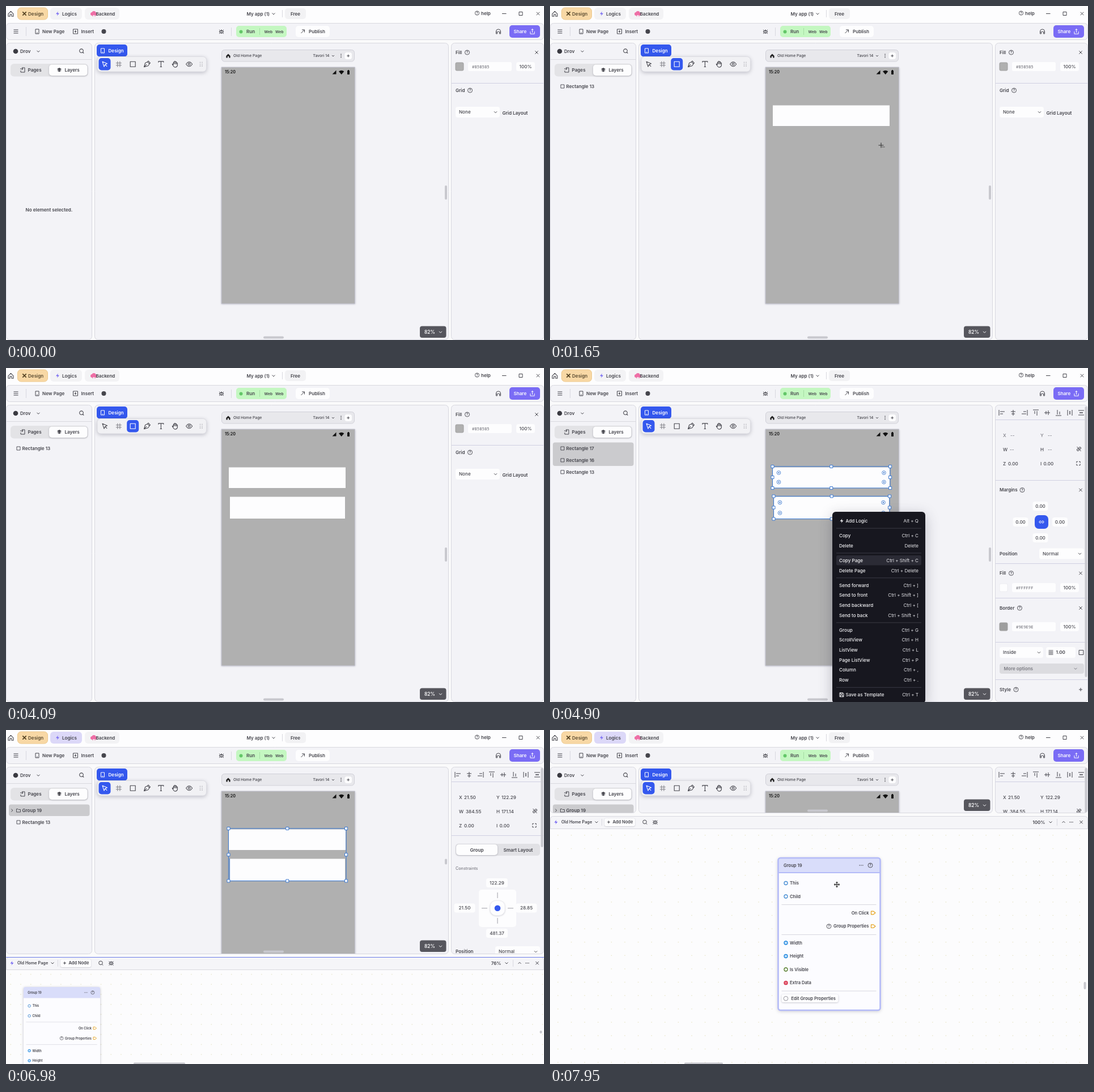
An HTML page with a canvas that plays this animation: 949 by 590 pixels, repeating every 7.99 s.

```html
<!DOCTYPE html>
<html lang="en">
<head>
<meta charset="utf-8">
<title>App builder walkthrough</title>
<style>
html, body { margin: 0; width: 100%; height: 100%; overflow: hidden; background: #fafafb; }
canvas { display: block; width: 949px; height: 590px; }
</style>
</head>
<body>
<canvas id="stage"></canvas>
<script>
const W = 949, H = 590, LOOP = 7990;
const canvas = document.getElementById('stage');
const ctx = canvas.getContext('2d');
const dpr = window.devicePixelRatio || 1;
canvas.width = W * dpr;
canvas.height = H * dpr;

const INK = '#45454c', SOFT = '#7c7c84', LINE = '#d8d8df', PANEL = '#f3f3f7';
const BLUE = '#3458ee', PAGE = '#b0b0b0', SELECT = '#3f7bd0', WHITE = '#fdfdfe';
const SANS = 'Inter, "Open Sans", sans-serif', MONO = '"Noto Sans Mono", monospace';

// Icons are drawn around their own centre.
const ICON = {
  home: 'M-4.5 0 0-4.5 4.5 0V4.5H1.5V1H-1.5V4.5H-4.5Z',
  x: 'M-2.7-2.7 2.7 2.7M2.7-2.7-2.7 2.7',
  plus: 'M-3 0H3M0-3V3',
  down: 'M-2.5-1.2 0 1.3 2.5-1.2',
  up: 'M-2.5 1.2 0-1.3 2.5 1.2',
  right: 'M-1.2-2.5 1.3 0-1.2 2.5',
  bolt: 'M1-4-3 .8H0L-1 4 3-.8H0Z',
  menu: 'M-4-3H4M-4 0H4M-4 3H4',
  phone: 'M-3-4H3V4H-3ZM-.8 2.4H.8',
  insert: 'M-4-4H4V4H-4ZM-2 0H2M0-2V2',
  bug: 'M-2.5-1.5H2.5V2Q0 5-2.5 2ZM-1.5-1.5Q0-4.5 1.5-1.5M-4-3-2.5-1.5M4-3 2.5-1.5M-4.3.6H-2.5M2.5.6H4.3M-4 4-2.3 2.5M4 4 2.3 2.5M-1 .5H1M-1 2H1',
  arrow: 'M-3 3 3-3M-1.5-3H3V1.5',
  upload: 'M-3.6 0V4.3H3.6V0M0 2V-4.5M-2-2.5 0-4.5 2-2.5',
  headset: 'M-4 2V0A4 4 0 0 1 4 0V2M-4 1H-2V4H-4ZM4 1H2V4H4ZM-2 1Q0-1 2 1',
  search: 'M3.3 0A3.3 3.3 0 1 1-3.3 0A3.3 3.3 0 1 1 3.3 0M2.4 2.4 4.3 4.3',
  pages: 'M-1-4H4V4H-3V1M-4-2H1M-1-4 1-2-1 0',
  layers: 'M0-4 4-1.5 0 1-4-1.5ZM-4 .8 0 3.5 4 .8',
  tools: 'M-3.2-3.2 3.2 3.2M3.2-3.2-3.2 3.2',
  cursor: 'M-4-4.5 4.5-1 .8.8-1 4.5ZM1 1 4.2 4.2',
  grid: 'M-2-5V5M2-5V5M-5-2H5M-5 2H5',
  box: 'M-4.5-4.5H4.5V4.5H-4.5Z',
  pen: 'M-5 5-3-2 1-4 4.5-.5 2 3ZM-5 5-.5.5M1-4 2.5-5.5 5.8-2 4.5-.5',
  type: 'M-4.5-3V-4.8H4.5V-3M0-4.8V4.8M-1.7 4.8H1.7',
  hand: 'M-3 1V-3Q-2-4.5-1.4-3V-.5V-4.5Q-.3-6 .6-4.5V-.5V-3.8Q1.6-5 2.4-3.8V0V-2Q3.5-3 4.2-2V2Q3.5 5.5 0 5.5Q-2 5.5-5 0Q-4.5-1-3 1',
  eye: 'M-5.5 0Q0-8 5.5 0Q0 8-5.5 0ZM1.8 0A1.8 1.8 0 1 1-1.8 0A1.8 1.8 0 1 1 1.8 0',
  folder: 'M-3.5-2.5H-1L0-1.5H3.5V3H-3.5Z',
  small: 'M-3-3H3V3H-3Z',
  link: 'M-.8-1.8H-2.2A1.8 1.8 0 0 0-2.2 1.8H-.8M.8-1.8H2.2A1.8 1.8 0 0 1 2.2 1.8H.8M-1.8 0H1.8',
  expand: 'M-3.2-1V-3.2H-1M1-3.2H3.2V-1M3.2 1V3.2H1M-1 3.2H-3.2V1',
  save: 'M-3.5-3.5H2L3.5-2V3.5H-3.5ZM-2-3.5V-1.2H1.5V-3.5M-2 3.5V.8H2V3.5',
  event: 'M-3.5-2.8H.5L4 0 .5 2.8H-3.5Z',
  weight: 'M-4-3.5H4M-4-1H4M-4 1.3H4M-4 3.5H4',
  alignLeft: 'M-5-5V5M-3-2H5M-3 2H2',
  alignMid: 'M0-5V5M-4-2H4M-3 2H3',
  cross: 'M-4.5 0H4.5M0-4.5V4.5',
  move: 'M-4.5 0H4.5M0-4.5V4.5M-3-1.5-4.5 0-3 1.5M3-1.5 4.5 0 3 1.5M-1.5-3 0-4.5 1.5-3M-1.5 3 0 4.5 1.5 3'
};
const shapes = {};
for (const k in ICON) shapes[k] = new Path2D(ICON[k]);

function icon(name, x, y, color = INK, o = {}) {
  ctx.save();
  ctx.translate(x, y);
  ctx.rotate(o.turn || 0);
  const k = o.k || 1;
  ctx.scale(k, k);
  ctx.lineWidth = (o.w || 1) / k;
  ctx.lineJoin = 'round';
  ctx.strokeStyle = ctx.fillStyle = color;
  if (o.fill) ctx.fill(shapes[name]);
  else ctx.stroke(shapes[name]);
  ctx.restore();
}

function text(s, x, y, o = {}) {
  const size = o.size || 8.1;
  ctx.font = `${o.weight || 600} ${size}px ${o.font || SANS}`;
  ctx.fillStyle = o.color || INK;
  ctx.textAlign = o.align || 'left';
  ctx.fillText(s, x, y + size * 0.36);
}

function rect(x, y, w, h, r, fill, stroke, shadow) {
  ctx.save();
  ctx.beginPath();
  ctx.roundRect(x, y, w, h, r);
  if (shadow) {
    ctx.shadowColor = 'rgba(40,40,60,.28)';
    ctx.shadowBlur = shadow * dpr;
    ctx.shadowOffsetY = shadow / 4 * dpr;
  }
  if (fill) { ctx.fillStyle = fill; ctx.fill(); }
  ctx.restore();
  if (stroke) { ctx.strokeStyle = stroke; ctx.lineWidth = 1; ctx.stroke(); }
}

function dot(x, y, r, fill, stroke, w = 1) {
  ctx.beginPath();
  ctx.arc(x, y, r, 0, 7);
  if (fill) { ctx.fillStyle = fill; ctx.fill(); }
  if (stroke) { ctx.strokeStyle = stroke; ctx.lineWidth = w; ctx.stroke(); }
}

function line(x1, y1, x2, y2, color = LINE, w = 1) {
  ctx.beginPath();
  ctx.moveTo(x1, y1);
  ctx.lineTo(x2, y2);
  ctx.strokeStyle = color;
  ctx.lineWidth = w;
  ctx.stroke();
}

function help(x, y, r = 4) {
  dot(x, y, r, null, INK, 0.9);
  text('?', x, y, { size: r * 1.6, align: 'center' });
}

function more(x, y, dx, dy, color = INK) {
  for (let i = -1; i < 2; i++) dot(x + i * dx, y + i * dy, 0.8, color);
}

function panel(x, y, w, bottom, draw) {
  rect(x + 0.5, y + 0.5, w - 1, bottom - y - 1, 6, PANEL, LINE);
  ctx.save();
  ctx.beginPath();
  ctx.roundRect(x + 1, y + 1, w - 2, bottom - y - 2, 5);
  ctx.clip();
  draw();
  ctx.restore();
}

// Timing
const clamp = v => Math.max(0, Math.min(1, v));
const ease = v => v * v * (3 - 2 * v);
const span = (t, a, b) => ease(clamp((t - a) / (b - a)));
const mix = (a, b, p) => a + (b - a) * p;

// Position along stops of [time, x, y].
function along(stops, t) {
  let i = 0;
  while (i < stops.length - 2 && t > stops[i + 1][0]) i++;
  const [a, b] = [stops[i], stops[i + 1]];
  const p = span(t, a[0], b[0]);
  return [mix(a[1], b[1], p), mix(a[2], b[2], p)];
}

const CROSS = [[820, 330, 140], [1000, 393, 175], [1400, 599, 212], [1650, 584, 246],
  [2250, 395, 227], [2450, 395, 227], [3300, 598, 266], [3600, 592, 285], [3950, 384, 130]];

function stateAt(t) {
  const s = { t };
  s.rectTool = t >= 600 && t < 4200;
  s.stage = t < 4450 ? 'page' : t < 5340 ? 'multi' : 'group';
  s.cross = t >= 820 && t < 3950 ? along(CROSS, t) : null;
  s.logic = t >= 6540;
  s.top = s.logic ? mix(401, 152, span(t, 7020, 7320)) : 595;
  s.bottom = s.top - 5;
  s.menu = t >= 4740 && t < 5340 ? 1 : t >= 6020 && t < 6540 ? 2 : 0;
  s.hover = '';
  if (s.menu === 1 && t > 4850) {
    s.hover = t < 4960 ? 'Copy Page' : t < 5020 ? 'Send forward' : t < 5100 ? 'Send backward' : 'Group';
  } else if (s.menu === 2 && t > 6320) s.hover = 'Add Logic';
  return s;
}

function topBars(s) {
  rect(0, 0, W, 30, 0, WHITE);
  icon('home', 8.5, 13.8, INK, { w: 1.1 });
  rect(20.5, 3, 53, 21, 6, '#f8d8a5', '#edc98d');
  icon('tools', 32.5, 13.5, '#594626', { w: 1.8 });
  text('Design', 39, 13.7, { color: '#594a30' });
  rect(78, 3, 56, 21, 6, s.logic ? '#dcd8f8' : '#f3f3f5');
  icon('bolt', 91, 13.5, '#7567f2', { fill: 1 });
  text('Logics', 99, 13.7);
  rect(139, 3, 61, 21, 6, '#f3f3f5');
  dot(152, 14, 3, '#ee6fa6');
  dot(155, 12.5, 3.4, '#ee6fa6');
  dot(158, 14.2, 2.6, '#ee6fa6');
  line(153, 16, 153, 18.5, '#ee6fa6');
  line(157, 16, 157, 18.5, '#ee6fa6');
  text('Backend', 158 + 0.5, 13.7);
  text('My app (1)', 424.5, 13.7);
  icon('down', 472, 13.7);
  line(487.5, 7, 487.5, 20);
  rect(492, 4, 37, 19, 5, '#f2f2f4');
  text('Free', 510.5, 13.7, { align: 'center' });
  help(831, 12.5, 3.6);
  text('help', 838, 12.7);
  line(875, 13.5, 882.5, 13.5, INK);
  icon('small', 908, 13.5);
  icon('x', 938.5, 13.5);

  rect(0.5, 30.5, W - 1, 29, 6, PANEL, LINE);
  icon('menu', 17.5, 45, INK, { w: 1.1 });
  line(35.5, 37, 35.5, 53);
  icon('phone', 55, 45);
  text('New Page', 64, 45.2);
  icon('insert', 122.5, 45);
  text('Insert', 132.5, 45.2);
  dot(172.5, 45, 4, INK);
  icon('bug', 380, 45);
  line(397.5, 38, 397.5, 53);
  rect(406, 35, 89, 20, 5, '#c4f7c1');
  dot(414.5, 45.5, 3, '#63c768');
  text('Run', 424, 45.2);
  line(447.5, 39, 447.5, 51, '#a6dda5');
  text('Web', 455.5, 45.5, { size: 6.7 });
  text('Web', 475, 45.5, { size: 6.7 });
  rect(511, 35, 60, 20, 5, WHITE);
  icon('arrow', 523.5, 45);
  text('Publish', 534, 45.2);
  icon('headset', 868.5, 45);
  rect(888, 34, 54, 22, 5, '#7a6cf5');
  text('Share', 895.5, 45.2, { color: WHITE });
  icon('upload', 928.5, 45, WHITE);
}

function layerList(s) {
  if (s.t < 1400) {
    text('No element selected.', 76, 360, { align: 'center' });
    return;
  }
  const names = s.stage === 'group' ? ['Group 19', 'Rectangle 13']
    : s.t >= 4300 ? ['Rectangle 17', 'Rectangle 16', 'Rectangle 13'] : ['Rectangle 13'];
  if (s.stage !== 'page') rect(5, 131.5, 142.5, s.stage === 'multi' ? 41.5 : 20.5, 4, '#cbcbce');
  names.forEach((name, i) => {
    const y = 142 + i * 20.9;
    if (name.startsWith('Group')) {
      icon('right', 10.5, y);
      icon('folder', 22, y, INK, { w: 0.9 });
    } else icon('small', 22, y, INK, { w: 0.9 });
    text(name, 28.5, y);
  });
}

function leftPanel(s) {
  panel(0, 65, 152, s.bottom, () => {
    dot(17, 80, 4.3, '#3b3b42');
    text('Drov', 25, 80);
    icon('down', 57, 80);
    icon('search', 133, 79.2, INK, { w: 1.1 });
    line(0, 94.5, 152, 94.5);
    rect(8, 102, 137, 22.5, 6, '#e3e3e6');
    rect(76, 103.5, 67.5, 19.5, 5, WHITE, null, 3);
    icon('pages', 29, 113);
    text('Pages', 38.5, 113.2);
    icon('layers', 94, 113, INK, { fill: 1 });
    text('Layers', 103.5, 113.2);
    layerList(s);
  });
}

function handles(x1, y1, x2, y2, corners) {
  ctx.strokeStyle = SELECT;
  ctx.lineWidth = 1.1;
  ctx.strokeRect(x1, y1, x2 - x1, y2 - y1);
  const xs = [x1, (x1 + x2) / 2, x2], ys = [y1, (y1 + y2) / 2, y2];
  xs.forEach((x, i) => ys.forEach((y, j) => {
    if (i !== 1 || j !== 1) rect(x - 2.5, y - 2.5, 5, 5, 0, WHITE, SELECT);
  }));
  if (!corners) return;
  for (const x of [x1 + 11, x2 - 11]) for (const y of [y1 + 11, y2 - 10.5]) {
    dot(x, y, 3.3, WHITE, SELECT, 0.9);
    dot(x, y, 1.2, SELECT);
  }
}

function drawnBoxes(s) {
  const box = (x, y, w, h, from, to) => {
    const p = span(s.t, from, to);
    if (p > 0) rect(x, y, w * p, h * p, 0, WHITE);
  };
  box(393, 175.5, 206, 36.5, 1000, 1400);
  box(395, 227.5, 203, 38.5, 2450, 3300);
  if (s.stage === 'multi') {
    handles(392.5, 174, 600, 212, true);
    handles(394.5, 226.5, 599, 266.5, true);
  } else if (s.stage === 'group') {
    line(394.5, 227, 394.5, 266, SELECT);
    handles(392.5, 174, 600, 266.5, false);
  } else if (s.t > 4330) handles(392.5, 174, 600, 212, true);
}

function toolbar(s) {
  rect(160, 68, 54, 21.5, 5, BLUE);
  icon('phone', 170.5, 79, WHITE);
  text('Design', 180.5, 79.2, { color: WHITE });
  rect(161, 89.5, 192.5, 26.5, 6, '#f1f1f4', '#dcdce2', 7);
  const active = s.rectTool ? 2 : 0;
  ['cursor', 'grid', 'box', 'pen', 'type', 'hand', 'eye'].forEach((name, i) => {
    const x = 174 + i * 24.85;
    if (i === active) rect(x - 10.5, 92, 21, 21.5, 5, BLUE);
    icon(name, x, 102.7, i === active ? WHITE : i === 1 ? '#85858c' : INK, { w: 1.1 });
  });
  for (const x of [342.5, 346]) more(x, 102.7, 0, 3.2, '#a5a5ab');
}

function device() {
  rect(380.5, 77.5, 234, 20.5, 5, '#e8e8ec', '#d0d0d8');
  icon('home', 392, 88, '#222', { fill: 1, k: 0.8 });
  text('Old Home Page', 401, 88, { size: 6.8, weight: 500 });
  text('Tavori 14', 570.5, 88, { size: 6.8, weight: 500, align: 'right' });
  icon('down', 577, 88, INK, { k: 0.8 });
  more(591, 88, 0, 2.6);
  rect(597.5, 82, 12.5, 12, 4, WHITE);
  icon('plus', 603.7, 88, INK, { k: 0.8 });
  rect(380, 108, 235.5, 418, 0, PAGE, '#c6c6d4', 3);
  text('15:20', 386, 116.7, { size: 7.2, color: '#111' });
  ctx.fillStyle = '#111';
  ctx.beginPath();
  ctx.moveTo(575.5, 120.5); ctx.lineTo(582.5, 120.5); ctx.lineTo(582.5, 113.5);
  ctx.moveTo(591.7, 121);
  ctx.lineTo(587, 115.5);
  ctx.quadraticCurveTo(591.7, 112, 596.4, 115.5);
  ctx.fill();
  rect(602, 114, 4, 7, 0.7, '#111');
  rect(603, 113, 2, 2, 0, '#111');
}

function canvasPanel(s) {
  const b = s.bottom;
  panel(156, 65, 625, b, () => {
    device();
    drawnBoxes(s);
    toolbar(s);
    const len = Math.max(0, (b - 265) / 13);
    if (len) rect(774, (65 + b) / 2 + 2 - len / 2, 4, len, 2, '#c8c8ce');
    rect(454, b - 6.5, 36, 4, 2, '#c8c8ce');
    rect(730, b - 24.5, 46.5, 20.5, 4, '#56565d');
    text('82%', 738, b - 14, { color: WHITE, size: 8.3 });
    icon('down', 766.5, b - 14, WHITE);
    if (s.cross) {
      const [x, y] = s.cross;
      icon('cross', x, y, '#333', { w: 1.1 });
      more(x + 4, y + 3, 1.8, 0, '#555');
    }
  });
}

// Inspector parts
function heading(name, y, close = 'x', q = 0) {
  text(name, 793, y);
  if (q) help(q, y);
  if (close) icon(close, 936, y);
}

function rule(y) { line(785, y, 948, y, '#d0d0e2'); }

function value(s, x, y, w = 27) {
  rect(x - w / 2, y - 8, w, 16, 4, WHITE);
  text(s, x, y, { align: 'center', weight: 500 });
}

function select(s, x, y, w) {
  rect(x, y - 9.5, w, 19, 4, WHITE);
  text(s, x + 6, y, { weight: 500 });
  icon('down', x + w - 7.5, y);
}

function colorRow(color, hex, y) {
  rect(793, y - 7, 14, 14, 2, color, color === WHITE ? '#ececf0' : '#a0a0a0');
  rect(815, y - 8, 77, 16, 3, WHITE);
  text(hex, 822, y, { font: MONO, size: 7.3, weight: 400, color: '#66666e' });
  value('100%', 916.5, y, 33);
}

function margins(y) {
  heading('Margins', y, 'x', 833);
  value('0.00', 865, y + 28.5);
  value('0.00', 830, y + 56.5);
  value('0.00', 899.5, y + 56.5);
  value('0.00', 865, y + 84.5);
  rect(855, y + 44.5, 24, 24, 7, BLUE);
  icon('link', 867, y + 56.5, WHITE);
}

function position(y) {
  text('Position', 793, y);
  select('Normal', 863, y, 79);
}

function geometry(v) {
  for (let i = 0; i < 8; i++) {
    const x = 797 + i * 20, turn = [0, 0, Math.PI, Math.PI / 2, Math.PI / 2, -Math.PI / 2, 0, Math.PI / 2][i];
    const mid = i === 1 || i === 4;
    if (i < 6) icon(mid ? 'alignMid' : 'alignLeft', x, 79, INK, { turn });
    else {
      ctx.save();
      ctx.translate(x, 79);
      ctx.rotate(turn);
      line(-4, -5, -4, 5, INK);
      line(4, -5, 4, 5, INK);
      line(0, -3, 0, 3, INK, 1.4);
      ctx.restore();
    }
  }
  rule(91.5);
  ['X', 'Y', 'W', 'H', 'Z', 'I'].forEach((k, i) => {
    const x = i % 2 ? 865 : 799, y = 119 + (i >> 1) * 24.8;
    const grey = v[i] === '--';
    text(k, x, y, { weight: 500, color: grey && i < 2 ? SOFT : INK });
    text(v[i], x + (k === 'W' ? 12 : k === 'I' ? 5.5 : 9 + (grey ? 4 : 0)), y, { weight: 500, color: grey ? SOFT : INK });
  });
  icon('link', 933, 143, INK, { turn: -0.7 });
  line(929.5, 139, 936.5, 147, INK);
  icon('expand', 932, 168.5);
}

const inspector = {
  page() {
    heading('Fill', 82, 'x', 813.5);
    colorRow(PAGE, '#B5B5B5', 107);
    rule(136.5);
    heading('Grid', 149, null, 818.5);
    select('None', 793, 187.5, 78);
    text('Grid Layout', 875.5, 189.3);
  },
  multi() {
    geometry(['--', '--', '--', '--', '0.00', '0.00']);
    rule(198.5);
    margins(215.5);
    position(328);
    rule(345.5);
    heading('Fill', 362.5, 'x', 813.5);
    colorRow(WHITE, '#FFFFFF', 388);
    rule(406.5);
    heading('Border', 424, 'x', 828.5);
    colorRow('#9e9e9e', '#9E9E9E', 457);
    rule(484.5);
    select('Inside', 793, 502.5, 77);
    rect(875, 493, 52, 19, 4, WHITE);
    icon('weight', 883.5, 502.5);
    text('1.00', 892.5, 502.5);
    icon('small', 937, 502.5, INK, { k: 1.3 });
    rect(793, 522, 149, 18, 4, '#dcdce0');
    text('More options', 800.5, 531, { color: SOFT });
    icon('down', 927, 531, SOFT);
    rule(550.5);
    heading('Style', 568, 'plus', 822);
    more(830, 591, 8, 0, SOFT);
    rect(943.5, 68, 4, 478, 2, '#c8c8ce');
  },
  group() {
    geometry(['21.50', '122.29', '384.55', '171.14', '0.00', '0.00']);
    rule(186.5);
    rect(793, 201, 149, 21, 5, '#e1e1e5');
    rect(794, 202, 73, 19, 5, WHITE, null, 3);
    text('Group', 830.5, 211.7, { align: 'center' });
    text('Smart Layout', 903.5, 211.7, { align: 'center' });
    text('Constraints', 793, 244, { size: 7.2, weight: 500, color: SOFT });
    value('122.29', 866, 270, 38);
    value('21.50', 809, 314.5, 37);
    value('28.85', 918, 314.5, 37);
    value('481.37', 866, 359, 38);
    rect(834, 282, 66, 66, 5, WHITE);
    line(867, 287, 867, 297, '#bdbdc3', 1.5);
    line(867, 332, 867, 342, '#bdbdc3', 1.5);
    line(839, 314.8, 849, 314.8, '#bdbdc3', 1.5);
    line(885, 314.8, 895, 314.8, '#bdbdc3', 1.5);
    rect(854, 301.5, 26, 26, 10, WHITE, '#ededf2', 3);
    dot(867, 314.8, 5.3, BLUE);
    position(391.5);
    rule(421);
    margins(438.5);
    rule(545.5);
    heading('Fill', 563.5, 'x', 813.5);
    colorRow(WHITE, '#FFFFFF', 588);
    rect(943.5, 67, 4, 140, 2, '#c8c8ce');
  }
};

// '-' starts a new section.
const MENU = ['Add Logic|Alt + Q', '-', 'Copy|Ctrl + C', 'Delete|Delete', '-',
  'Copy Page|Ctrl + Shift + C', 'Delete Page|Ctrl + Delete', '-',
  'Send forward|Ctrl + ]', 'Send to front|Ctrl + Shift + ]',
  'Send backward|Ctrl + [', 'Send to back|Ctrl + Shift + [', '-', 'Group|Ctrl + G'];
const LISTS = ['ScrollView|Ctrl + H', 'ListView|Ctrl + L', 'Page ListView|Ctrl + P'];
const SAVE = ['-', 'Save as Template|Ctrl + T'];
const MENUS = [null,
  [...MENU, ...LISTS, 'Column|Ctrl + ,', 'Row|Ctrl + .', ...SAVE],
  [...MENU, 'Un-Group|Ctrl + Shift + G', ...LISTS, ...SAVE]];

function contextMenu(s) {
  if (!s.menu) return;
  const [x, y0] = s.menu === 1 ? [498, 254] : [533.5, 232.5];
  const items = MENUS[s.menu];
  const h = items.reduce((sum, it) => sum + (it === '-' ? 8.5 : 17.65), 13.5);
  rect(x, y0, 164, h, 6, '#17171f', null, 24);
  let y = y0 + 16;
  for (const it of items) {
    if (it === '-') {
      line(x + 7, y - 4.5, x + 157, y - 4.5, '#3a3a44');
      y += 8.5;
      continue;
    }
    const [name, keys] = it.split('|');
    if (name === s.hover) rect(x + 7, y - 9, 150, 17.5, 3, '#2b2b35');
    const mark = name === 'Add Logic' ? 'bolt' : name === 'Save as Template' ? 'save' : '';
    if (mark) icon(mark, x + 16.5, y, '#f4f4f6', { fill: mark === 'bolt' });
    text(name, x + (mark ? 23.5 : 12), y, { color: '#f4f4f6', weight: 500 });
    text(keys, x + 152, y, { color: '#e4e4e8', weight: 400, align: 'right' });
    y += 17.65;
  }
}

function node(x, y, k, active) {
  ctx.save();
  ctx.translate(x, y);
  ctx.scale(k, k);
  const label = { size: 7.6 };
  rect(0, 0, 180, 269, 4, '#fcfcff', null, active ? 6 : 4);
  rect(0, 0, 180, 26, [4, 4, 0, 0], '#d9ddfa');
  text('Group 19', 9.5, 13, label);
  more(146.5, 13, 2.8, 0);
  help(162.5, 13);
  const pin = (name, py, color, fill) => {
    dot(13.5, py, 3, fill || WHITE, color, 1.3);
    text(name, 20.5, py, label);
  };
  const event = (name, py) => {
    text(name, 160, py, { size: 7.6, align: 'right' });
    icon('event', 167.5, py, '#e6a21c', { w: 1.2 });
  };
  pin('This', 44.5, '#4a8fd4');
  pin('Child', 68, '#4a8fd4');
  line(6, 82.5, 173, 82.5);
  event('On Click', 97);
  help(89.5, 120.7, 3.9);
  event('Group Properties', 120.7);
  line(6, 135.5, 173, 135.5);
  pin('Width', 150, '#1f86dd', '#bfe0fb');
  pin('Height', 173.5, '#1f86dd', '#bfe0fb');
  pin('Is Visible', 197, '#557d2b');
  pin('Extra Data', 220.7, '#d42a45', '#e8788a');
  line(6, 235, 173, 235);
  rect(6, 241, 100, 14, 3, WHITE, null, 3);
  dot(13.5, 248.3, 3.8, WHITE, SOFT, 0.8);
  text('Edit Group Properties', 23, 248.3, label);
  if (active) {
    ctx.beginPath();
    ctx.roundRect(0, 0, 180, 269, 4);
    ctx.lineWidth = 2.6;
    ctx.strokeStyle = '#b4bbf8';
    ctx.stroke();
    line(0, 26, 180, 26, '#b4bbf8', 2);
  }
  ctx.restore();
}

function logicPanel(s) {
  if (!s.logic) return;
  const t = s.t, T = s.top, y = T + 10.7;
  const zoom = span(t, 7350, 7600), drag = span(t, 7640, 7880);
  const k = mix(0.75, 1, zoom);
  const nx = mix(31, 402.5, drag), ny = T + mix(53, 74, drag);
  rect(0, T - 1, W, H - T + 1, 0, '#fcfcfd');
  const step = 23.6 * k;
  ctx.fillStyle = '#e8e5c6';
  for (let gx = (nx + 12) % step; gx < W; gx += step)
    for (let gy = T + 22 + (ny - T + 8) % step; gy < H; gy += step) ctx.fillRect(gx, gy, 1.4, 1.4);
  node(nx, ny, k, t > 7450);
  rect(0.5, T + 0.5, W - 1, 22, [5, 5, 0, 0], '#f5f5f8', LINE);
  if (t < 7400) line(0, T + 0.5, W, T + 0.5, '#6b7be6', 1.2);
  icon('bolt', 10.5, y, '#7567f2', { fill: 1 });
  text('Old Home Page', 20, y, { size: 7.3 });
  icon('down', 82, y);
  line(91.5, T + 5, 91.5, T + 17);
  rect(96, T + 4, 54, 14, 3, WHITE, null, 2);
  icon('plus', 103.5, y, INK, { k: 0.8 });
  text('Add Node', 110.5, y, { size: 7.5 });
  icon('search', 167, y - 0.3);
  icon('bug', 185.5, y);
  text(Math.round(mix(76, 100, zoom)) + '%', 873.5, y, { align: 'right' });
  icon('down', 883, y);
  line(894.5, T + 5, 894.5, T + 17);
  icon('up', 906, y);
  more(919.5, y, 2.5, 0);
  icon('x', 937, y);
  rect(mix(225, 237, zoom), 587.5, mix(91, 68, zoom), 3, 1.5, '#c8c8ce');
  rect(941.5, mix(531, 445, span(t, 7020, 7320)), 4, mix(5, 13, zoom), 2, '#c8c8ce');
  if (t > 7480) icon('move', nx + 103.5, ny + 47, '#444', { w: 1.3 });
}

function draw(now) {
  const s = stateAt((now - start) % LOOP);
  ctx.setTransform(dpr, 0, 0, dpr, 0, 0);
  rect(0, 0, W, H, 0, '#fafafb');
  topBars(s);
  leftPanel(s);
  canvasPanel(s);
  panel(785, 65, 164, s.bottom, inspector[s.stage]);
  contextMenu(s);
  logicPanel(s);
  requestAnimationFrame(draw);
}

const start = performance.now();
requestAnimationFrame(now => draw(Math.max(now, start)));
</script>
</body>
</html>
```
